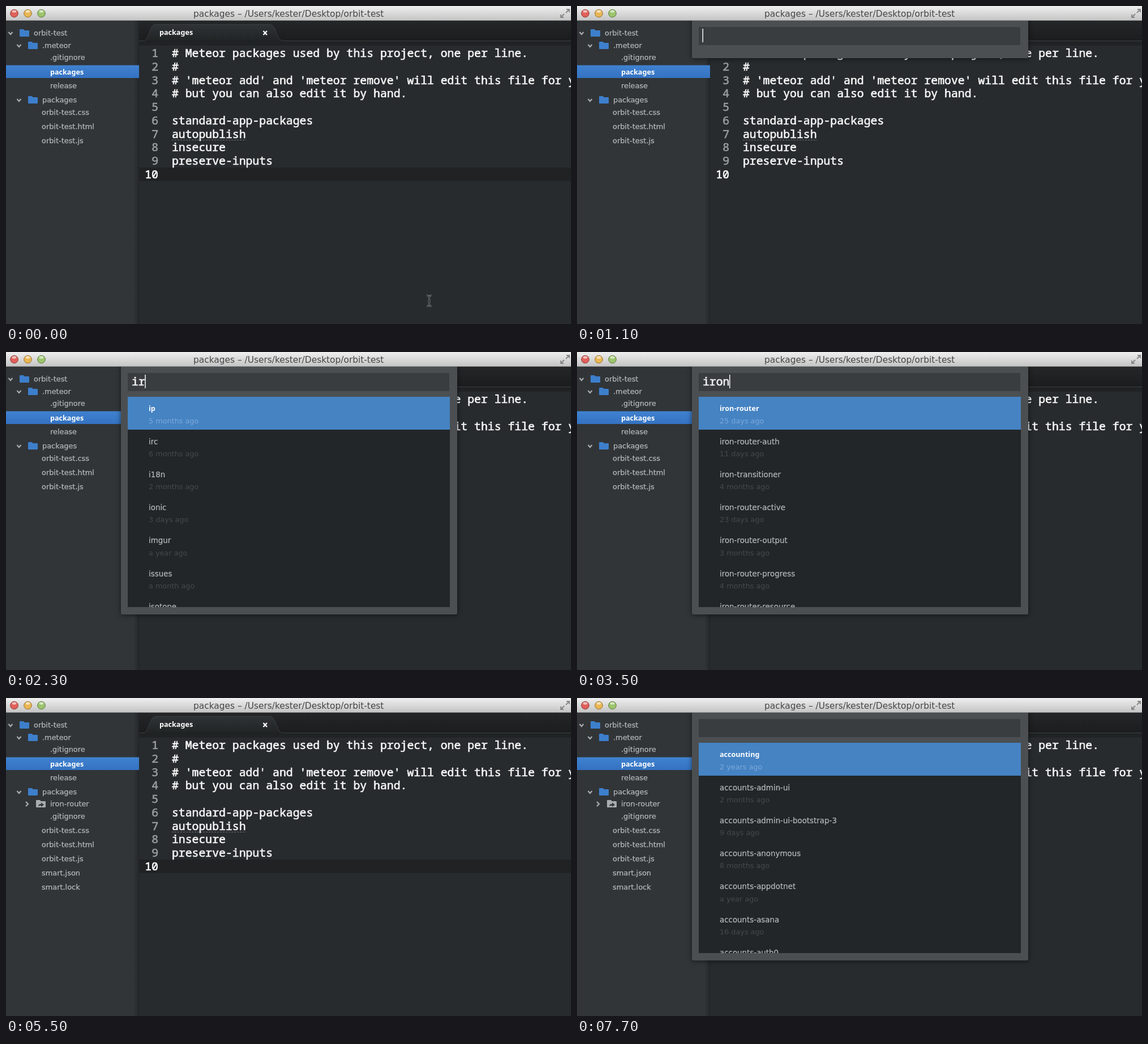
Animation, 998 px wide and 561 px high, one loop 8000 ms. Source, as an HTML page:

```html
<!DOCTYPE html>
<html lang="en">
<head>
<meta charset="utf-8">
<title>Package installer</title>
<style>
  html, body { margin: 0; width: 100%; height: 100%; overflow: hidden; background: #272b2e; }
  svg { display: block; position: absolute; left: 0; top: 0; }
  text { white-space: pre; }
  .ui { font: 12.9px "DejaVu Sans", sans-serif; fill: #b6b9bb; stroke: #b6b9bb; stroke-width: .25; }
  .item { font: 13.4px "DejaVu Sans", sans-serif; fill: #b6b9bb; stroke: #b6b9bb; stroke-width: .2; }
  .strong { font: 700 12.6px "Noto Sans", sans-serif; fill: #fff; }
  .sub { font: 12.8px "DejaVu Sans", sans-serif; fill: #46494c; }
  .sub.on { fill: #7ea9da; }
  .title { font: 15.4px "DejaVu Sans", sans-serif; fill: #464646; }
  .code, .num { font: 500 19.8px "Noto Sans Mono", monospace; stroke-width: .65; }
  .code { fill: #f6f6f6; stroke: #f6f6f6; }
  .num { fill: #9a9da0; stroke: #9a9da0; text-anchor: end; }
  .num.on { fill: #fff; stroke: #fff; }
  #panel { filter: drop-shadow(0 1px 4px rgba(0, 0, 0, .55)); }
</style>
</head>
<body>
<svg id="stage" width="998" height="561" viewBox="0 0 998 561">
  <defs>
    <linearGradient id="bar" x2="0" y2="1"><stop stop-color="#efefef"/><stop offset="1" stop-color="#c3c3c3"/></linearGradient>
    <linearGradient id="row" x2="0" y2="1"><stop stop-color="#4082d0"/><stop offset="1" stop-color="#3472c2"/></linearGradient>
    <linearGradient id="tabs" x2="0" y2="1"><stop stop-color="#242627"/><stop offset="1" stop-color="#1a1c1d"/></linearGradient>
    <linearGradient id="tab" x2="0" y2="1"><stop stop-color="#303335"/><stop offset="1" stop-color="#212425"/></linearGradient>
    <linearGradient id="edge"><stop stop-opacity="0"/><stop offset="1" stop-opacity=".25"/></linearGradient>
    <clipPath id="listClip"><rect x="215" y="79" width="569" height="371"/></clipPath>
  </defs>

  <g id="editor">
    <rect x="235" y="26" width="763" height="535" fill="#272b2e"/>
    <rect x="235" y="26" width="763" height="36" fill="url(#tabs)"/>
    <rect x="235" y="62" width="763" height="8" fill="#202324"/>
    <path d="M235 61.5H243C253 61 253 32.5 264 32.5H466C478 32.5 477 61 489 61.5H998" fill="url(#tab)" stroke="#3b3e40"/>
    <text class="strong" x="271" y="51">packages</text>
    <path d="M454.5 44l6.500 7m0-7l-6.500 7" stroke="#fff" stroke-width="2.300"/>
    <rect id="lineBand" x="235" y="285" width="763" height="24" fill="#202224"/>
    <path d="M293 236.500H424" stroke="#6d7275" stroke-dasharray="3 2"/>
  </g>

  <rect id="caret" x="292.500" y="285" width="1.500" height="23" fill="#f4f5f5"/>

  <g id="sidebar">
    <rect y="26" width="235" height="535" fill="#313538"/>
    <rect x="225" y="26" width="10" height="535" fill="url(#edge)"/>
    <path d="M234.500 26V561" stroke="#222527"/>
    <rect y="104.500" width="235" height="22.500" fill="url(#row)"/>
  </g>

  <g id="pointer" fill="none">
    <path d="M743 510.500q4.500 0 4.500 4v11q0 4-4.500 4m9-19q-4.500 0-4.500 4m0 11q0 4 4.500 4m-7-9h5" stroke="#85888a" stroke-width="2.600"/>
    <path d="M743 510.500q4.500 0 4.500 4v11q0 4-4.500 4m9-19q-4.500 0-4.500 4m0 11q0 4 4.500 4m-7-9h5" stroke="#17191a"/>
  </g>

  <g id="panel">
    <rect id="frame" x="203" y="20" width="594" rx="3" fill="#4b4f52"/>
    <rect x="215" y="37" width="568" height="32" rx="1" fill="#393d40"/>
    <text id="query" class="code" x="222" y="59"></text>
    <rect id="queryCaret" y="40" width="1.500" height="24" fill="#f4f5f5"/>
    <g id="lists" clip-path="url(#listClip)">
      <rect x="215" y="79" width="569" height="371" fill="#222629"/>
      <rect x="215" y="79" width="569" height="58" fill="#4583c3"/>
    </g>
  </g>

  <g id="titleBar">
    <rect width="998" height="26" fill="url(#bar)"/>
    <path d="M0 25.500H998" stroke="#8b8b8b"/>
    <text class="title" x="331" y="18.500">packages – /Users/kester/Desktop/orbit-test</text>
    <path d="M989 12l6-6m-5 0h5v5M986 14l-6 6m0-5v5h5" fill="none" stroke="#858585" stroke-width="1.800"/>
  </g>
</svg>

<script>
const $ = id => document.getElementById(id);

function add(parent, tag, attrs, content) {
  const el = document.createElementNS('http://www.w3.org/2000/svg', tag);
  for (const key in attrs) el.setAttribute(key, attrs[key]);
  if (content) el.textContent = content;
  return parent.appendChild(el);
}
const group = parent => add(parent, 'g', {});
const label = (parent, cls, x, y, content) => add(parent, 'text', { class: cls, x, y }, content);
const show = (el, on) => { el.style.display = on ? '' : 'none'; };

// Window buttons
[['#e0605a', '#8f3a36'], ['#eab654', '#94702f'], ['#9cc46c', '#587c3a']].forEach(([fill, stroke], i) => {
  const cx = 14.5 + 24 * i;
  add($('titleBar'), 'circle', { cx, cy: 13, r: 6.8, fill, stroke });
  add($('titleBar'), 'ellipse', { cx, cy: 9.5, rx: 3.8, ry: 2.2, fill: '#fff', opacity: .6 });
});

// Editor text
const lineY = n => 66.25 + 23.75 * n;
const lines = [
  '# Meteor packages used by this project, one per line.',
  '#',
  "# 'meteor add' and 'meteor remove' will edit this file for you,",
  '# but you can also edit it by hand.',
  '',
  'standard-app-packages',
  'autopublish',
  'insecure',
  'preserve-inputs',
  ''
];
lines.forEach((line, i) => {
  const n = i + 1;
  label($('editor'), n === 10 ? 'num on' : 'num', 269, lineY(n), n);
  label($('editor'), 'code', 293, lineY(n), line);
});
const addedLine = group($('editor'));
label(addedLine, 'code', 293, lineY(10), 'iron-router');
label(addedLine, 'num', 269, lineY(11), '11');

// Project tree
function chevron(parent, x, y, open) {
  const d = open ? `M${x - 3.5} ${y - 2}l3.500 4l3.500-4` : `M${x - 2} ${y - 4}l4 4l-4 4`;
  add(parent, 'path', { d, fill: 'none', stroke: '#a9acaf', 'stroke-width': 2.2 });
}
function folder(parent, x, y, fill) {
  add(parent, 'path', { d: `M${x} ${y - 6}q0-1 1-1h6l1.500 2h7.500q1 0 1 1v9q0 1-1 1h-15q-1 0-1-1z`, fill });
}
const treeText = (parent, x, y, name) => label(parent, 'ui', x, y + 4.3, name);
const tree = $('sidebar');
[[8, 48, 'orbit-test'], [23, 70, '.meteor'], [23, 166, 'packages']].forEach(([x, y, name]) => {
  chevron(tree, x, y, true);
  folder(tree, x + 16, y, '#3d7fcc');
  treeText(tree, x + 41, y, name);
});
treeText(tree, 78, 91, '.gitignore');
label(tree, 'strong', 78, 120.5, 'packages');
treeText(tree, 78, 141, 'release');

const installed = group(tree);
chevron(installed, 37, 187, false);
folder(installed, 53, 187, '#a9acaf');
add(installed, 'path', { d: 'M57 191q0-4 5-4v-2.500l5 3.800l-5 3.800v-2.300q-3-.3-5 1.200z', fill: '#313538' });
treeText(installed, 78, 187, 'iron-router');
treeText(installed, 78, 209, '.gitignore');
treeText(installed, 63, 309, 'smart.json');
treeText(installed, 63, 334, 'smart.lock');

const files = group(tree);
['css', 'html', 'js'].forEach((ext, i) => treeText(files, 63, 187.5 + 25 * i, 'orbit-test.' + ext));

// Package lists
const packages = {
  all: [
    ['accounting', '2 years ago'], ['accounts-admin-ui', '2 months ago'],
    ['accounts-admin-ui-bootstrap-3', '9 days ago'], ['accounts-anonymous', '8 months ago'],
    ['accounts-appdotnet', 'a year ago'], ['accounts-asana', '16 days ago'], ['accounts-auth0', '']
  ],
  i: [
    ['ip', '5 months ago'], ['irc', '6 months ago'], ['i18n', '2 months ago'],
    ['ionic', '3 days ago'], ['imgur', 'a year ago'], ['issues', 'a month ago'], ['isotope', '']
  ],
  iron: [
    ['iron-router', '25 days ago'], ['iron-router-auth', '11 days ago'],
    ['iron-transitioner', '4 months ago'], ['iron-router-active', '23 days ago'],
    ['iron-router-output', '3 months ago'], ['iron-router-progress', '4 months ago'],
    ['iron-router-resource', '']
  ]
};
const lists = {};
for (const key in packages) {
  lists[key] = group($('lists'));
  packages[key].forEach(([name, age], i) => {
    const y = 104.3 + 58.25 * i;
    label(lists[key], i ? 'item' : 'strong', 252, y, name);
    label(lists[key], i ? 'sub' : 'sub on', 252, y + 21.3, age);
  });
}

// Each track lists [start ms, value] steps
const tracks = {
  pointer: [[0, true], [500, false]],
  panel: [[0, false], [1000, true], [3600, false], [7100, true]],
  query: [[0, ''], [1900, 'i'], [2200, 'ir'], [2800, 'iro'], [3000, 'iron'], [3600, '']],
  queryCaret: [[0, true], [1400, false], [1800, true], [7700, false]],
  list: [[0, ''], [1500, 'all'], [2000, 'i'], [2400, 'iron'], [3600, ''], [7700, 'all']],
  installed: [[0, false], [5000, true]],
  addedLine: [[0, false], [5800, true]]
};
const at = (track, t) => tracks[track].filter(([start]) => start <= t).pop()[1];

function draw(t) {
  const panel = at('panel', t);
  const query = at('query', t);
  const list = at('list', t);
  const done = at('installed', t);

  show($('pointer'), at('pointer', t));
  show($('panel'), panel);
  show($('lineBand'), !panel);
  show($('caret'), !panel && (t + 500) % 800 < 400);

  $('query').textContent = query;
  $('queryCaret').setAttribute('x', 221.5 + 11.88 * query.length);
  show($('queryCaret'), at('queryCaret', t));
  $('frame').setAttribute('height', list ? 443 : 72);
  show($('lists'), list);
  for (const key in lists) show(lists[key], key === list);

  show(installed, done);
  files.setAttribute('transform', `translate(0 ${done ? 46.5 : 0})`);
  show(addedLine, at('addedLine', t));
}

const begin = performance.now();
function tick() {
  draw((performance.now() - begin) % 8000);
  requestAnimationFrame(tick);
}
tick();
</script>
</body>
</html>
```
